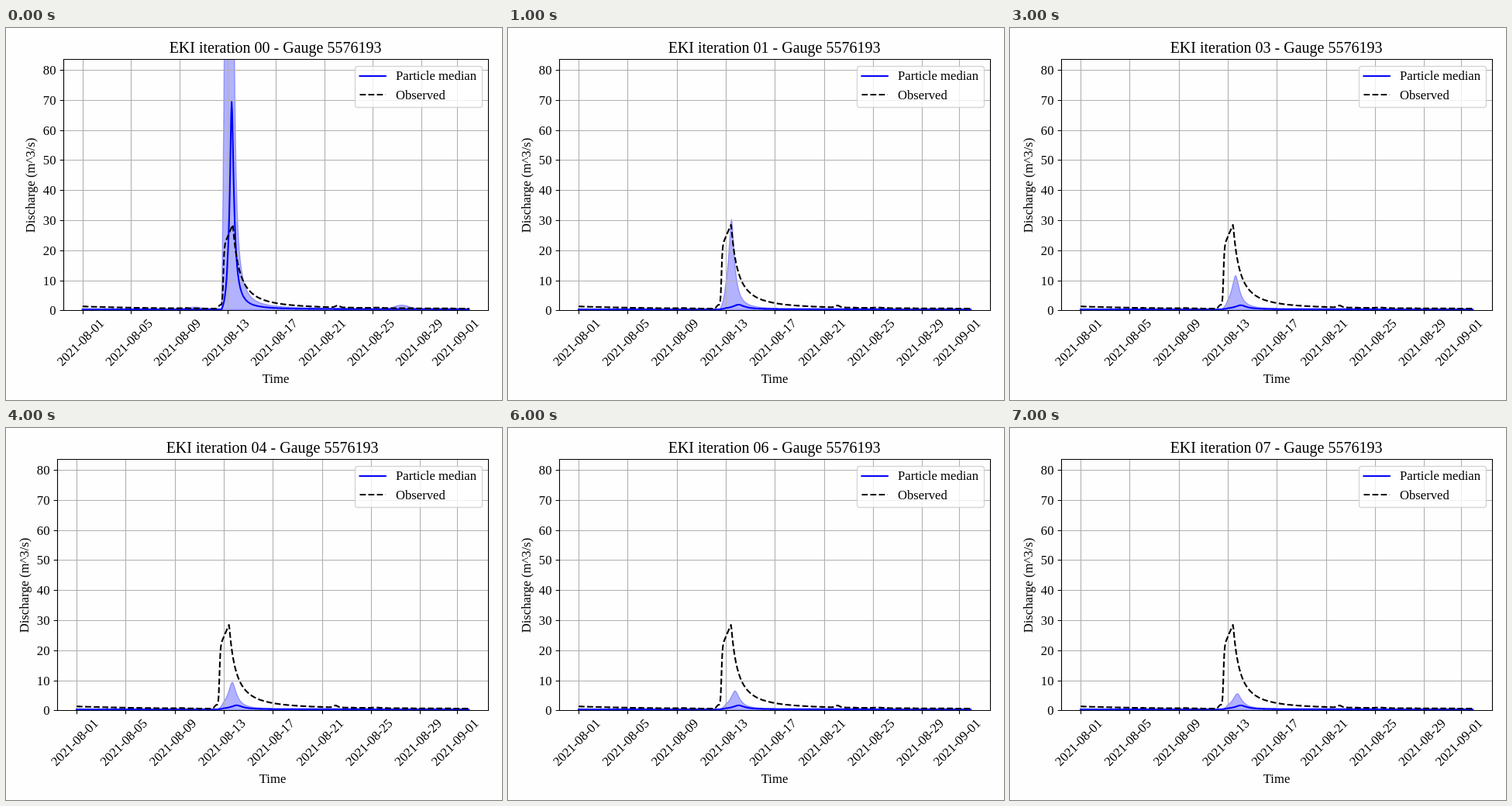
An HTML page for the animation above (8000 ms loop, 640 px wide and 480 px high).

```html
<!DOCTYPE html>
<html lang="en">
<head>
<meta charset="utf-8">
<title>Discharge by iteration</title>
<style>
  html, body { margin: 0; width: 100%; height: 100%; overflow: hidden; background: #fefefe; }
  svg { display: block; width: 640px; height: 480px; }
  text { font: 16.67px "Liberation Serif", "Times New Roman", serif; fill: #000; }
  .title { font-size: 20px; }
  .mid { text-anchor: middle; }
  .end { text-anchor: end; }
  .grid { stroke: #b0b0b0; stroke-width: 1.11; }
  .frame { fill: none; stroke: #000; stroke-width: 1.11; }
  .band { fill: #00f; fill-opacity: .3; stroke: #00f; stroke-opacity: .3; stroke-width: 1.39; }
  .line { fill: none; stroke-width: 2.08; stroke-linejoin: round; }
  .median { stroke: #00f; stroke-linecap: square; }
  .observed { stroke: #000; stroke-dasharray: 7.7 3.33; }
  .legend { fill: #fff; fill-opacity: .8; stroke: #ccc; stroke-opacity: .8; stroke-width: 1.39; }
  .chart { visibility: hidden; animation: show 8s step-end infinite; }
  @keyframes show {
    0% { visibility: visible; }
    12.5%, 100% { visibility: hidden; }
  }
</style>
</head>
<body>
<svg id="stage" viewBox="0 0 640 480"></svg>
<script>
const BOTTOM = 364.3, RIGHT = 622.3, UNIT = 3.88;
const HOURS = 767, SPAN = HOURS / 24;

// Building blocks of a hydrograph; t is in days
const bell = (t, at, height, width) => height * Math.exp(-(((t - at) / width) ** 2));
const sigmoid = x => 1 / (1 + Math.exp(-x));
const onset = t => Math.min(1, Math.max(0, (t - 11.5) / .5));
const flood = (t, at, height, rise, fall) =>
  height * onset(t) / (1 + (Math.abs(t - at) / (t < at ? rise : fall)) ** 1.8);

function observed(t) {
  const base = .45 + .85 * Math.exp(-t / 6);
  const recession = 24.9 / Math.max(t - 11.5, .05) ** 1.71;
  const crest = Math.min(22.2 + 9.5 * (t - 11.82), recession);
  return base + crest * sigmoid((t - 11.64) / .04) + bell(t, 11.4, 1.2, .2)
    + bell(t, 8.5, .15, .3) + bell(t, 21.1, .6, .25) + bell(t, 24.4, .15, .5);
}

const median = n => t => .35 + (n
  ? flood(t, 13.05, 1.25 + .3 / n, .6, .6)
  : flood(t, 12 + 8 / 24, 69, .18, .215));

// The band's peak shrinks, drifts later and widens with each iteration
const peaks = [450, 30, 20.5, 11.2, 9, 7.2, 6.1, 5.2];
function upper(n) {
  if (n === 0) {
    return t => .45 + flood(t, 12.3, peaks[0], .5, .12)
      + bell(t, 9.3, .6, .9) + bell(t, 26.4, 1.2, .8);
  }
  const ease = Math.exp(-n / 3);
  const width = .5 - .3 * ease;
  return t => .35 + flood(t, 12.82 - .5 * ease, peaks[n], width, width);
}

const snap = v => Math.round(v) + .5;
const text = (x, y, s, cls = '', extra = '') =>
  `<text x="${x}" y="${y}" class="${cls}" ${extra}>${s}</text>`;
const path = (d, cls) => `<path class="${cls}" d="${d}"/>`;
const dateOf = day => new Date(Date.UTC(2021, 7, 1 + day)).toISOString().slice(0, 10);

function chart(n) {
  const left = n ? 65.8 : 73.8;
  const width = RIGHT - left;
  const mid = left + width / 2;
  const edge = snap(left);
  const px = day => left + width * (1 + day * 20 / SPAN) / 22;
  const py = v => BOTTOM - v * UNIT;

  // One sample per hour
  const trace = f => 'M' + Array.from({ length: HOURS + 1 }, (_, h) =>
    px(h / 24).toFixed(2) + ' ' + py(f(h / 24)).toFixed(2)).join('L');

  let grid = '', ticks = '', labels = '';
  for (const day of [0, 4, 8, 12, 16, 20, 24, 28, 31]) {
    const x = snap(px(day));
    grid += `M${x} 40.5V364.5`;
    ticks += `M${x} 364.5v4.86`;
    labels += text(0, 4, dateOf(day), 'mid',
      `transform="translate(${(px(day) - 1.6).toFixed(2)} 406.8) rotate(-45)"`);
  }
  for (let v = 0; v <= 80; v += 10) {
    const y = snap(py(v));
    grid += `M${edge} ${y}H622.5`;
    ticks += `M${edge} ${y}h-4.86`;
    labels += text(edge - 10, y + 5.2, v, 'end');
  }

  return `<g class="chart" style="animation-delay:${n - 8}s">
    <g clip-path="url(#plot)">
      ${path(trace(upper(n)) + `L${px(SPAN)} ${py(.2)}L${px(0)} ${py(.2)}Z`, 'band')}
      ${path(grid, 'grid')}
      ${path(trace(median(n)), 'line median')}
      ${path(trace(observed), 'line observed')}
    </g>
    ${path(ticks + `M${edge} 40.5H622.5V364.5H${edge}Z`, 'frame')}
    ${labels}
    ${text(mid - .5, 32, `EKI iteration 0${n} - Gauge 5576193`, 'title mid')}
    ${text(mid, 458, 'Time', 'mid')}
    ${text(0, 0, 'Discharge (m^3/s)', 'mid', `transform="translate(${edge - 37.5} 203) rotate(-90)"`)}
    <rect class="legend" x="450.5" y="49.5" width="164" height="53" rx="3.3"/>
    ${path('M456.5 62H489.8', 'line median')}
    ${path('M456.5 86H489.8', 'line observed')}
    ${text(503, 67.3, 'Particle median')}
    ${text(503, 92, 'Observed')}
  </g>`;
}

const clip = '<clipPath id="plot"><rect y="40.5" width="640" height="324"/></clipPath>';
document.getElementById('stage').innerHTML = clip + peaks.map((_, n) => chart(n)).join('');
</script>
</body>
</html>
```
